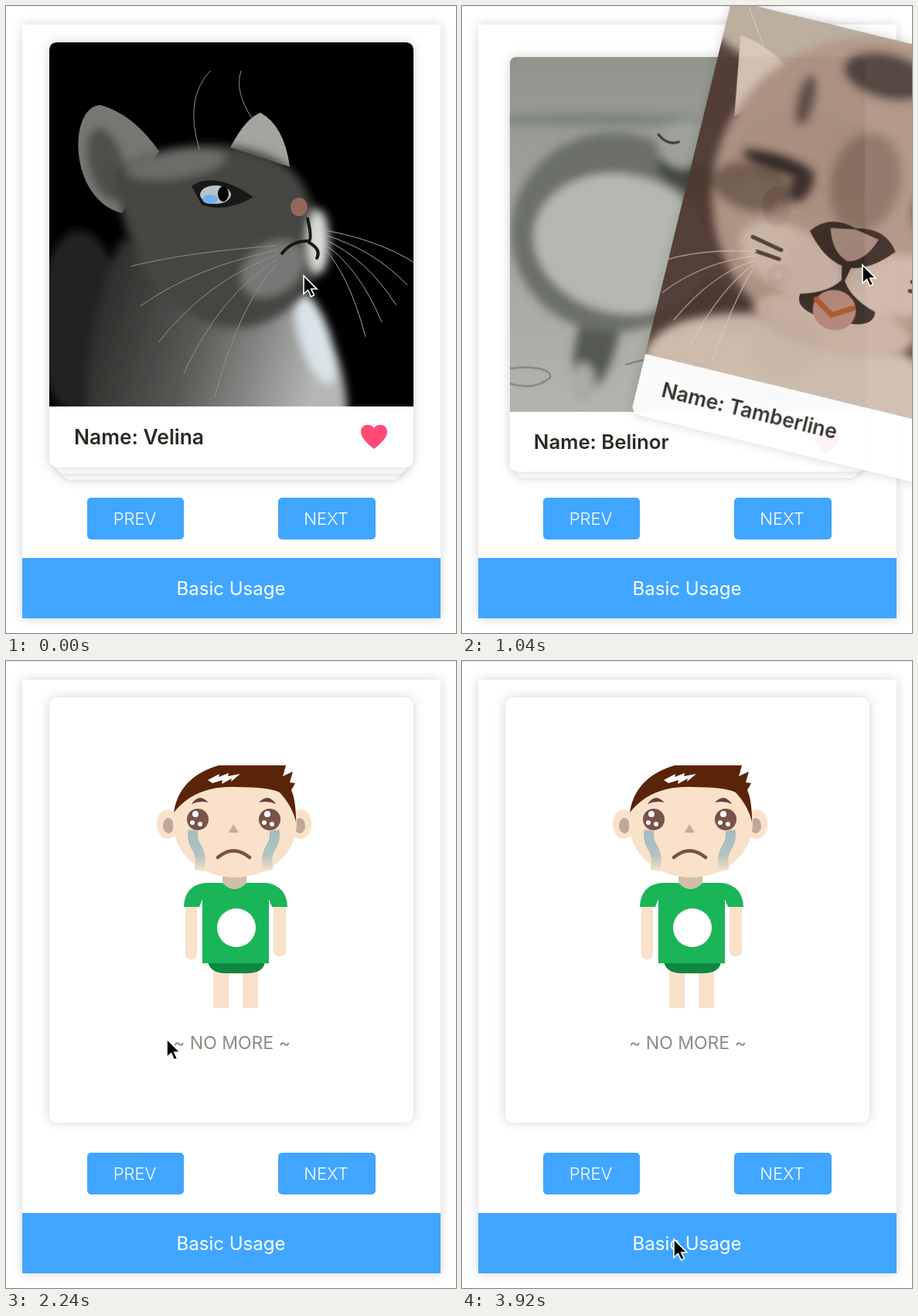
Animation of 582x811 px, one loop 4000 ms. Source, as an HTML page:

```html
<!DOCTYPE html>
<html lang="en">
<head>
<meta charset="utf-8">
<title>Card stack</title>
<style>
  html, body { margin: 0; width: 100%; height: 100%; overflow: hidden; background: #fff; }
  svg { display: block; width: 582px; height: 811px; }
  text { font: 22px Inter, "Open Sans", sans-serif; }
  .label { fill: #fff; text-anchor: middle; }
  .light { font-weight: 300; }
  .name { font-size: 26.4px; font-weight: 600; fill: #2c2a24; }
  .shadow { fill: #fff; filter: drop-shadow(0 0 7px rgba(0,0,0,.17)); }
  .soft { filter: url(#blur); }
  .line { fill: none; stroke-linecap: round; }
</style>
</head>
<body>
<svg viewBox="0 0 582 811">
  <defs>
    <filter id="blur"><feGaussianBlur stdDeviation="6"/></filter>
    <clipPath id="photo"><path d="M56 518V58q0-11 11-11H516q11 0 11 11V518z"/></clipPath>
    <linearGradient id="fur" x2="1" y2=".2">
      <stop stop-color="#20201f"/><stop offset=".5" stop-color="#585855"/><stop offset="1" stop-color="#b5b7b4"/>
    </linearGradient>
    <linearGradient id="paper" x2="0" y2="1">
      <stop stop-color="#91958d"/><stop offset="1" stop-color="#b2b5ad"/>
    </linearGradient>
    <linearGradient id="tear" gradientUnits="userSpaceOnUse" x1="0" y1="218" x2="0" y2="272">
      <stop stop-color="#a3bbc0"/><stop offset=".6" stop-color="#b3c2c0"/><stop offset="1" stop-color="#f9e2c9"/>
    </linearGradient>
  </defs>

  <path d="M0 .5H582" stroke="#efefef"/>
  <path class="shadow" d="M21 24H562V792H21z"/>
  <g fill="#41a6ff">
    <rect x="105" y="636" width="125" height="54" rx="5"/>
    <rect x="352" y="636" width="126" height="54" rx="5"/>
    <path d="M21 714H562V792H21z"/>
  </g>
  <text class="label light" x="166.500" y="671">PREV</text>
  <text class="label light" x="414" y="671">NEXT</text>
  <text class="label" x="291" y="762" style="font-size:24px">Basic Usage</text>

  <g id="stack"></g>

  <path id="cursor" d="M0 0V23.500L5.500 18.500L9.500 27L13.500 25L9.700 17H17z" stroke="#fff" stroke-width="1.600"/>
</svg>

<script>
const blob = (fill, x, y, rx, ry = rx, turn = 0) =>
  `<ellipse fill="${fill}" rx="${rx}" ry="${ry}" transform="translate(${x} ${y}) rotate(${turn})"/>`;
const shape = (fill, d) => `<path fill="${fill}" d="${d}"/>`;
const line = (stroke, width, d) => `<path class="line" stroke="${stroke}" stroke-width="${width}" d="${d}"/>`;
const soft = (...parts) => `<g class="soft">${parts.join("")}</g>`;
const mirror = (axis, part) => part + `<g transform="matrix(-1 0 0 1 ${2 * axis} 0)">${part}</g>`;
const backdrop = fill => shape(fill, "M56 47H527V518H56z");

// a fan of arcs leaving one point, angles in degrees
function whiskers(color, x, y, from, to, length, count = 5) {
  let d = "";
  for (let i = 0; i < count; i++) {
    const angle = (from + (to - from) * i / (count - 1)) * Math.PI / 180;
    const dx = Math.cos(angle) * length, dy = Math.sin(angle) * length;
    d += `M${x} ${y + 6 * i}q${dx * .6} ${dy * .3} ${dx} ${dy}`;
  }
  return line(color, 1, d);
}

const darkCat = [
  backdrop("#000"),
  soft(
    blob("#232321", 95, 410, 55, 120),
    shape("url(#fur)", "M105 535Q100 400 150 300L375 370Q440 430 442 535z"),
    blob("#d9e3e8", 400, 430, 20, 62, -18)),
  shape("#777773", "M150 268C80 250 80 130 122 128Q165 140 198 188z"),
  shape("#a5a5a0", "M290 183Q310 145 329 138Q360 155 367 208z"),
  soft(
    blob("#4d4d4a", 130, 205, 22, 48, -15),
    shape("#454542", "M140 215C200 165 370 160 392 250C430 300 405 395 315 415C255 425 160 380 140 215z"),
    blob("#6c6c69", 220, 205, 65, 18, -8),
    blob("#d9dbd7", 404, 305, 14, 42),
    blob("#777774", 345, 340, 45, 32, -35)),
  shape("#181817", "M240 233Q270 213 320 247Q285 268 253 257z"),
  blob("#b9c3c5", 271, 244, 20, 12),
  blob("#72b2ec", 264, 250, 10, 6),
  blob("#000", 281, 243, 7, 10),
  blob("#92675a", 379, 260, 11, 12),
  line("#171716", 4, "M390 275Q396 300 392 304Q370 303 357 320M392 306Q408 315 402 326"),
  whiskers("#8f8f8b", 350, 310, 172, 115, 190),
  whiskers("#a3a39f", 412, 290, 20, 65, 125),
  line("#8f8f8b", 1, "M250 185Q230 120 264 84M318 145Q295 110 304 84")
].join("");

const tanCat = [
  backdrop("#4c372f"),
  soft(blob("#b7a999", 250, 50, 240, 85), blob("#cfbcac", 270, 520, 215, 95)),
  mirror(292, shape("#d6c4b5", "M78 88Q130 95 165 130L95 192z")),
  soft(
    blob("#ac9181", 285, 250, 200, 203),
    blob("#4a3b34", 275, 95, 58, 30),
    blob("#8b7262", 280, 235, 45, 65),
    mirror(282,
      blob("#5b493f", 180, 150, 12, 34) +
      blob("#735d50", 140, 275, 52, 32) +
      blob("#ccb5a5", 210, 355, 72, 40, 15)),
    blob("#c8b1a1", 282, 425, 105, 35)),
  mirror(282,
    soft(blob("#2f231e", 165, 238, 48, 11, 4), blob("#3a2b25", 200, 258, 14, 24, 15)) +
    shape("#382821", "M283 296Q245 285 225 313Q250 343 276 347L283 380z") +
    shape("#382821", "M283 360Q270 385 232 395Q228 420 283 418z") +
    shape("#a58779", "M283 297L250 303Q260 335 283 340z")),
  blob("#b58478", 280, 405, 28, 26),
  line("#ad5423", 7, "M254 397L278 412L303 397"),
  mirror(282, line("#4e3a30", 5, "M155 338l40 8M165 355l30 3") + whiskers("#e0d0c1", 165, 355, 160, 100, 130)),
  line("#e0d0c1", 1, "M110 95L80 50M430 110L450 50")
].join("");

const greyCat = [
  backdrop("url(#paper)"),
  soft(
    blob("#7f847c", 170, 130, 140, 9),
    blob("#555853", 172, 420, 27, 75, 14),
    blob("#444742", 335, 375, 75, 32, 12),
    blob("#6c7069", 193, 280, 135, 132),
    blob("#b5b8b0", 205, 295, 118, 92, 12),
    blob("#696d66", 445, 245, 122, 128),
    blob("#3f423d", 510, 190, 32, 55),
    blob("#444742", 515, 320, 22, 35),
    blob("#aaada5", 375, 285, 52, 75, 10),
    blob("#8f938b", 445, 270, 30, 18),
    blob("#43463f", 295, 205, 45, 20, 20),
    blob("#9da199", 288, 163, 36, 32),
    blob("#70746d", 420, 430, 46, 42),
    blob("#a8aba3", 154, 478, 15, 26)),
  blob("#171a16", 410, 245, 19, 27),
  blob("#171a16", 413, 336, 17, 14),
  blob("#777d77", 411, 244, 7),
  blob("#777d77", 413, 335, 5),
  line("#31342e", 3, "M328 312Q345 325 355 315Q355 300 370 296M355 315Q370 320 376 328M253 150Q265 165 280 160"),
  line("#6b6f68", 1.5, "M350 380Q345 440 302 458M56 460Q110 455 110 472Q90 490 56 480M210 455Q240 445 285 445")
].join("");

const sadBoy = [
  mirror(295, blob("#f9e2c9", 209, 211, 14, 19) + blob("#bda89a", 210, 213, 7, 10)),
  `<g fill="#f9e2c9">
    <rect x="232" y="300" width="15" height="86" rx="7"/><rect x="346" y="300" width="16" height="82" rx="7"/>
    <path d="M268 400H288V449H268zM306 400H326V449H306z"/>
  </g>`,
  shape("#cfbfaa", "M280 272H311V287Q296 303 280 287z"),
  blob("#f9e2c9", 296, 210, 80, 70),
  shape("#5a2408", "M217 196C222 161 247 143 275 135H362L358 149L371 143L367 157L374 158L369 167Q375 180 375 208Q370 187 354 170Q340 163 300 163Q245 160 217 196z"),
  shape("#fff", "M261 154L276 146L275 150L288 145L287 149L303 146L291 156L292 152L279 159L280 154L267 158z"),
  mirror(294.5,
    `<path class="line" stroke="url(#tear)" stroke-width="13" style="stroke-linecap:butt" d="M242 219Q240 232 247 242Q254 254 250 271"/>` +
    shape("#6b4038", "M240 185Q250 170 262 183Q250 180 240 185z") +
    blob("#795249", 248, 205, 14)),
  ...[245, 338].map(x => blob("#fff", x, 198, 4) + blob("#fff", x - 4, 209, 3) + blob("#fff", x + 6, 211, 3)),
  shape("#c3aa99", "M294 211L301 222H288z"),
  line("#7b5049", 4.5, "M274 254Q294 237 315 254"),
  shape("#0f8742", "M261 389H335Q333 404 311 404H285Q264 404 261 389z"),
  shape("#19b558", "M258 287H280Q296 303 311 287H337Q363 291 364 318H344L340 308V391H254V308L250 318H230Q231 290 258 287z"),
  blob("#fff", 298, 345, 25),
  `<text x="292" y="502" text-anchor="middle" fill="#8f8c82" style="font-size:23px">~ NO MORE ~</text>`
].join("");

const heart = shape("#ff4a76", "M476 573C466 565 459 558 459 550.500C459 541 471 539 476 546C481 539 493 541 493 550.500C493 558 486 565 476 573z");
const pet = (photo, name) =>
  `<g clip-path="url(#photo)">${photo}</g><text class="name" x="88" y="567">Name: ${name}</text>${heart}`;

const clamp = v => Math.min(1, Math.max(0, v));
const smooth = u => u * u * (3 - 2 * u);
const back = u => 1 + 1.9 * (u - 1) ** 3 + .9 * (u - 1) ** 2;

// run through moves { from, to, target, curve }, each starting where the last one ended
const follow = (start, moves, t) => moves.reduce(
  (value, [from, to, target, curve = smooth]) => value + (target - value) * curve(clamp((t - from) / (to - from))), start);

const AWAY = 700, NEXT_CLICK = 3400;
// drift: vertical travel per horizontal pixel
const cards = [
  { art: pet(darkCat, "Velina"), drift: -.12, moves: [[80, 310, -202], [315, 525, -AWAY]] },
  { art: pet(tanCat, "Tamberline"), drift: -.03, moves: [[780, 1040, 221], [1080, 1300, AWAY]] },
  { art: pet(greyCat, "Belinor"), drift: -.06, moves: [[1740, 2000, -222], [2000, 2220, -AWAY],
    [2800, 3080, 0, back], [NEXT_CLICK, 3640, AWAY]] },
  { art: sadBoy, drift: 0, moves: [] }
];
const pointer = [
  [80, 310, 183, 350], [520, 780, 297, 336], [780, 1040, 518, 335], [1100, 1740, 430, 335], [1740, 2000, 208, 345],
  [2000, 2240, 208, 489], [2260, 2640, 204, 660], [3000, 3300, 410, 662], [3480, 3900, 274, 748]
];
const pointerX = pointer.map(([from, to, x]) => [from, to, x]);
const pointerY = pointer.map(([from, to, , y]) => [from, to, y]);

const stack = document.getElementById("stack");
const cursor = document.getElementById("cursor");
stack.innerHTML = [...cards].reverse().map(card =>
  `<g><rect class="shadow" x="56" y="47" width="471" height="550" rx="11"/>${card.art}</g>`).join("");
const nodes = [...stack.children].reverse();

function draw(t) {
  const byButton = t >= NEXT_CLICK;
  let depth = 0;
  cards.forEach(({ drift, moves }, i) => {
    const x = follow(0, moves, t), gone = clamp(Math.abs(x) / AWAY);
    const angle = x * (byButton ? .0064 : .062);
    const y = byButton ? 0 : x * drift;
    const fade = byButton ? 1 - 1.5 * gone : 1 - .7 * gone ** 2;
    const opacity = gone === 1 ? 0 : clamp(fade) * clamp(3 - depth);
    nodes[i].setAttribute("transform",
      `translate(${291.5 + x} ${321.5 + y + 17.5 * depth}) rotate(${angle}) scale(${1 - .035 * depth}) translate(-291.5 -321.5)`);
    nodes[i].setAttribute("opacity", opacity);
    nodes[i].style.display = opacity > 0 ? "" : "none";
    depth += 1 - gone;
  });
  cursor.setAttribute("transform", `translate(${follow(385, pointerX, t)} ${follow(349, pointerY, t)})`);
}

function tick() {
  draw(performance.now() % 4000);
  requestAnimationFrame(tick);
}
tick();
</script>
</body>
</html>
```
